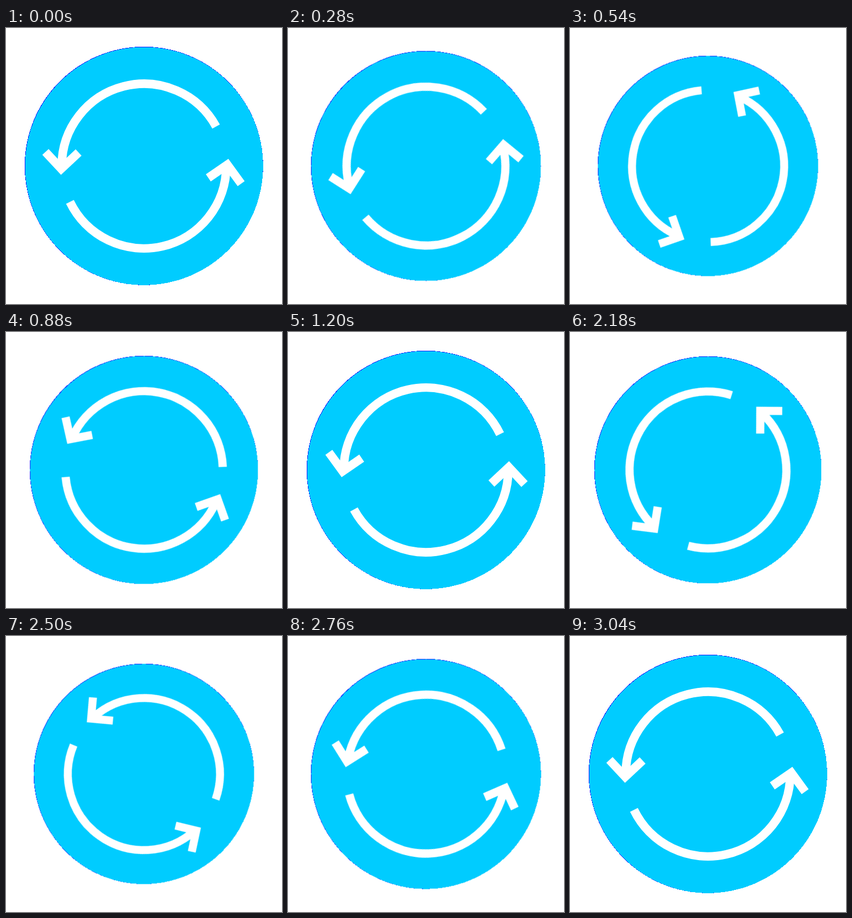
Recreate the animation shown at these times as an HTML page without scripts. Size 500 px wide and 500 px high, loop 3680 ms.

```html
<!DOCTYPE html>
<html lang="en">
<head>
<meta charset="utf-8">
<title>Refresh badge</title>
<style>
  html, body { margin: 0; width: 100%; height: 100%; overflow: hidden; background: #fff; }
  svg { display: block; width: 100vw; height: 100vh; }

  .disc { shape-rendering: crispEdges; }
  .rim { fill: #0019ff; }
  .face { fill: #0cf; }
  .arrows { fill: none; stroke: #fff; stroke-width: 15.6; stroke-miterlimit: 4; }

  .pulse, .arrows { transform-origin: 0 0; }
  .pulse { animation: pulse 1840ms cubic-bezier(.333, 0, .667, 1) infinite; }
  .arrows { animation: spin 3680ms linear infinite; }

  /* 600 ms in, 600 ms out, 640 ms rest */
  @keyframes pulse {
    0% { transform: scale(1); }
    32.609% { transform: scale(.922); }
    65.217%, 100% { transform: scale(1); }
  }

  /* two half turns, each followed by a rest */
  @keyframes spin {
    0% { transform: rotate(0deg); animation-timing-function: cubic-bezier(.535, 0, .512, 1); }
    32.609% { transform: rotate(-180deg); }
    50% { transform: rotate(-180deg); animation-timing-function: cubic-bezier(.351, 0, .411, 1); }
    82.609%, 100% { transform: rotate(-360deg); }
  }
</style>
</head>
<body>
<svg viewBox="-250 -250 500 500">
  <g class="pulse">
    <g class="disc">
      <circle class="rim" cx="-.2" cy="-.2" r="216"/>
      <circle class="face" cx=".15" cy=".15" r="215.6"/>
    </g>
    <g class="arrows">
      <path d="M130.6-71.6A149 149 0 0 0-149 0"/>
      <path d="M-178.5-25.5L-150 5L-118.5-24.5"/>
      <path d="M-134.2 65A149 149 0 0 0 149 0"/>
      <path d="M116.5 21.5L151-2.2L176 32"/>
    </g>
  </g>
</svg>
</body>
</html>
```
